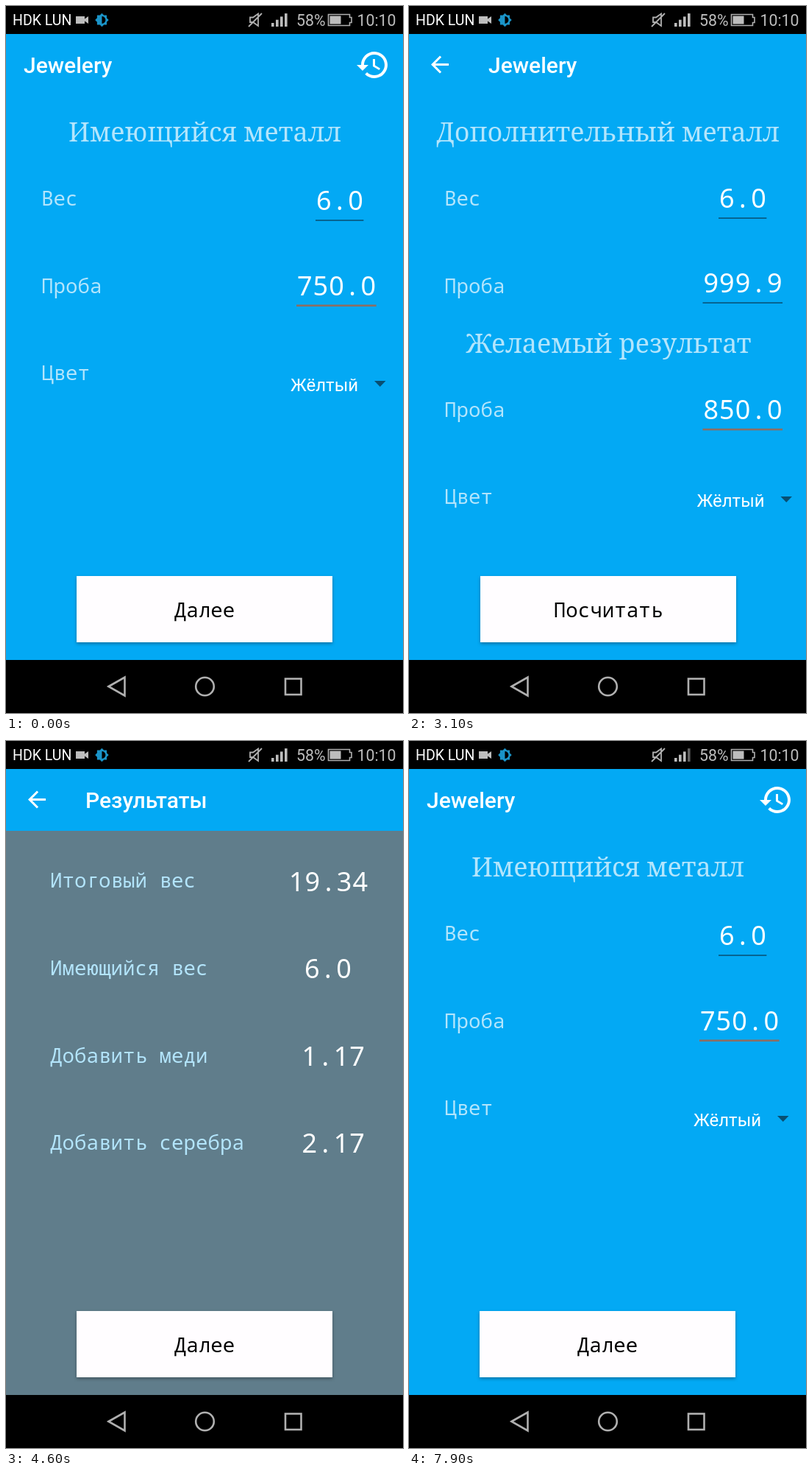
Animation of 540x960 px, one loop 8 s. Source, as an HTML page:

```html
<!DOCTYPE html>
<html lang="ru">
<head>
<meta charset="utf-8">
<title>Jewelery</title>
<style>
  html, body { margin: 0; width: 100%; height: 100%; overflow: hidden; background: #000; }
  svg { display: block; width: 100%; height: 100%; }

  .title { font: 500 30px Roboto, sans-serif; fill: #fff; }
  .head { font: 36px "Noto Serif", serif; fill: #b3e5fc; text-anchor: middle; }
  .label { font: 27.5px "Noto Sans Mono", monospace; fill: #b3e5fc; }
  .num { font: 36px "Noto Sans", sans-serif; fill: #fff; text-anchor: middle; }
  .pick { font: 24px Roboto, sans-serif; fill: #fff; }
  .btn rect { fill: #fffdff; filter: drop-shadow(0 2px 2px rgba(0, 0, 0, .32)); }
  .btn text { font: 27.5px "Noto Sans Mono", monospace; fill: #000; text-anchor: middle; }
  .status { font: 21.3px Roboto, sans-serif; fill: #bdbdbd; }
  .carrier { font-size: 19.5px; fill: #fff; }
  .line { fill: none; stroke: #b0b0b0; }

  /* Screens push each other to the left, decelerating over 200 ms. */
  .screen { animation: 8s cubic-bezier(.3333, .6667, .6667, 1) infinite; }
  #metal { animation-name: metal; }
  #extra { animation-name: extra; }
  #result { animation-name: result; }
  @keyframes metal {
    0%, 18.5% { transform: translateX(0); }
    21% { transform: translateX(-540px); animation-timing-function: step-end; }
    77.56% { transform: translateX(540px); }
    80.06%, 100% { transform: translateX(0); }
  }
  @keyframes extra {
    0%, 18.5% { transform: translateX(540px); }
    21%, 45.77% { transform: translateX(0); }
    48.27%, 100% { transform: translateX(-540px); }
  }
  @keyframes result {
    0%, 45.77% { transform: translateX(540px); }
    48.27%, 77.56% { transform: translateX(0); }
    80.06%, 100% { transform: translateX(-540px); }
  }

  .caret { fill: #6c98ae; opacity: 0; animation: blink 1s step-end infinite; }
  #extra .caret { animation-delay: -720ms; }
  @keyframes blink {
    0%, 70%, 100% { opacity: 0; }
    20% { opacity: 1; }
  }

  .weak { animation: weak 8s step-end infinite; }
  @keyframes weak {
    0% { fill: #bdbdbd; }
    91% { fill: #606060; }
    100% { fill: #bdbdbd; }
  }
</style>
</head>
<body>
<svg id="stage" viewBox="0 0 540 960"></svg>
<script>
  const BLUE = '#03a9f4', SLATE = '#607d8b', CELL = 21.6;

  const text = (cls, x, y, s) => `<text class="${cls}" x="${x}" y="${y}">${s}</text>`;
  const rect = (x, y, w, h, fill) =>
    `<rect x="${x}" y="${y}" width="${w}" height="${h}" fill="${fill}"/>`;

  // Digits sit in the middle of equal cells.
  const num = (x, y, s) =>
    text('num', [...s].map((c, i) => (x + CELL * (i + .5)).toFixed(1)).join(' '), y, s);

  const field = (x, y, s, active) => {
    const w = CELL * s.length + .6;
    return num(x, y, s) + (active
      ? rect(x - .5, y + 13, w, 2.6, '#8d6e63') +
        `<rect class="caret" x="${x - .5}" y="${y - 40}" width="1.2" height="51"/>`
      : rect(x - .5, y + 13, w, 1.5, '#084f72'));
  };

  const picker = (x, y, s) => text('pick', x, y, s) +
    `<path d="M${x + 114} ${y - 14}h15.5l-7.75 8z" fill="#084f72"/>`;

  const button = (x, s) =>
    `<g class="btn"><rect x="${x}" y="774" width="348" height="90"/>` +
    `<text x="${x + 174}" y="830">${s}</text></g>`;

  const back = '<path transform="translate(24 61.5) scale(1.5)" fill="#fff" ' +
    'd="M20 11H7.83l5.59-5.59L12 4l-8 8 8 8 1.41-1.41L7.83 13H20z"/>';

  const historyIcon = '<path transform="translate(475 56) scale(2)" fill="#fff" ' +
    'd="M13 3c-4.97 0-9 4.03-9 9H1l3.89 3.89.07.14L9 12H6c0-3.87 3.13-7 7-7s7 3.13 7 7-3.13 7-7 7' +
    'c-1.93 0-3.68-.79-4.94-2.06l-1.42 1.42C8.27 19.99 10.51 21 13 21c4.97 0 9-4.03 9-9s-4.03-9-9-9z' +
    'm-1 5v5l4.28 2.54.72-1.21-3.5-2.08V8z"/>';

  const screen = (id, bg, ...parts) =>
    `<g class="screen" id="${id}">${rect(0, 37, 540, 852, bg)}${parts.join('')}</g>`;

  const metal = screen('metal', BLUE,
    text('title', 24, 91, 'Jewelery'), historyIcon,
    text('head', 270.5, 184, 'Имеющийся металл'),
    text('label', 48, 271, 'Вес'), field(421.5, 277.3, '6.0'),
    text('label', 48, 390, 'Проба'), field(395.5, 392.5, '750.0', true),
    text('label', 48, 508, 'Цвет'), picker(387, 523, 'Жёлтый'),
    button(96, 'Далее'));

  const extra = screen('extra', BLUE,
    back, text('title', 108, 91, 'Jewelery'),
    text('head', 270.5, 184, 'Дополнительный металл'),
    text('label', 48, 271, 'Вес'), field(421.5, 274.3, '6.0'),
    text('label', 48, 390, 'Проба'), field(400, 389.3, '999.9'),
    text('head', 271.5, 470.5, 'Желаемый результат'),
    text('label', 48, 557.5, 'Проба'), field(400, 560.7, '850.0', true),
    text('label', 48, 676, 'Цвет'), picker(391.5, 680, 'Жёлтый'),
    button(97, 'Посчитать'));

  const rows = [
    ['Итоговый вес', 384.5, '19.34'],
    ['Имеющийся вес', 405.5, '6.0'],
    ['Добавить меди', 402, '1.17'],
    ['Добавить серебра', 402, '2.17']
  ];
  const result = screen('result', SLATE,
    rect(0, 37, 540, 85, BLUE), back, text('title', 108, 91, 'Результаты'),
    ...rows.map(([name, x, value], i) => {
      const y = 199.3 + i * 118.6;
      return text('label', 60, y, name) + num(x, y + 4.3, value);
    }),
    button(96, 'Далее'));

  const bars = [0, 1, 2, 3].map(i =>
    `<rect ${i == 3 ? 'class="weak"' : ''} x="${361 + i * 6}" y="${23 - i * 4.3}" ` +
    `width="3.6" height="${5 + i * 4.3}" fill="#bdbdbd"/>`).join('');

  const status = rect(0, 0, 540, 38, '#000') +
    text('status carrier', 9, 26, 'HDK LUN') +
    '<path d="M95 14h12v3.5l5-3.5v10l-5-3.500v3.5h-12z" fill="#bdbdbd"/>' +
    '<path transform="translate(120.6 9.2) scale(.82)" fill="#1a94c8" ' +
    'd="M20 15.31L23.31 12 20 8.690V4h-4.690L12 .69 8.690 4H4v4.690L.69 12 4 15.31V20h4.690L12 23.31 ' +
    '15.31 20H20zM12 18V6c3.31 0 6 2.690 6 6s-2.690 6-6 6z"/>' +
    '<path class="line" stroke-width="1.8" d="M332 15.500h4l7-5V27l-7-5h-4zM330 28L348 10"/>' +
    bars + text('status', 395, 27, '58%') +
    '<path class="line" stroke-width="1.6" d="M438.500 11.500h29v4h2.500v7h-2.500v4h-29z"/>' +
    rect(440.5, 13.5, 15, 11, '#bdbdbd') +
    text('status', 477.5, 27, '10:10');

  const nav = rect(0, 888, 540, 72, '#000') +
    '<g class="line" stroke-width="2.6"><path d="M139.500 924L161.500 911.500V936.500z"/>' +
    '<circle cx="270.500" cy="924" r="12.300"/>' +
    '<rect x="380" y="913.500" width="21.500" height="21.500"/></g>';

  document.getElementById('stage').innerHTML = metal + extra + result + status + nav;
</script>
</body>
</html>
```
